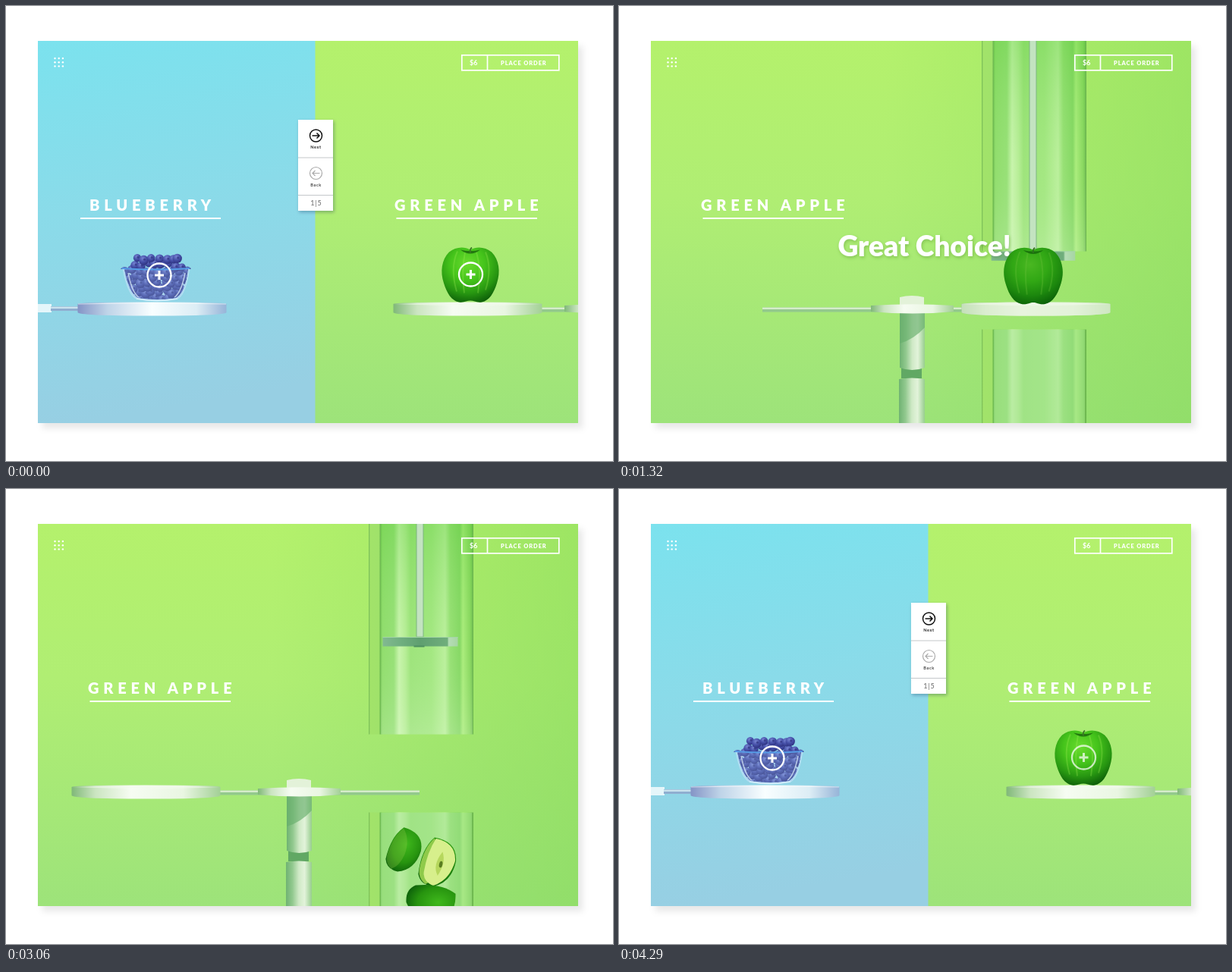
Recreate the animation shown at these times as an HTML page. Size 800x600 px, loop 4320 ms.

```html
<!DOCTYPE html>
<html lang="en">
<head>
<meta charset="utf-8">
<title>Fruit order</title>
<style>
html, body { margin: 0; width: 100%; height: 100%; overflow: hidden; background: #fff; }
svg { display: block; width: 800px; height: 600px; font-family: Lato, "Open Sans", sans-serif; }
.title { font-weight: 900; font-size: 20px; letter-spacing: 5.8px; fill: #fff; }
.small { font-size: 5.6px; font-weight: 700; letter-spacing: .6px; text-anchor: middle; }
</style>
</head>
<body>
<svg viewBox="0 0 800 600">
  <defs>
    <filter id="cardShadow" x="-5%" y="-5%" width="112%" height="112%"><feDropShadow dx="6" dy="7" stdDeviation="4" flood-color="#000" flood-opacity=".09"/></filter>
    <filter id="panelShadow" x="-30%" y="-20%" width="160%" height="140%"><feDropShadow dx="1.5" dy="2" stdDeviation="2" flood-color="#124" flood-opacity=".3"/></filter>
    <filter id="textShadow" x="-10%" y="-30%" width="120%" height="160%"><feDropShadow dx="1" dy="2" stdDeviation="2" flood-color="#3a7a20" flood-opacity=".35"/></filter>
    <linearGradient id="blue" x2=".12" y2="1"><stop stop-color="#7be2ee"/><stop offset=".45" stop-color="#8adbe9"/><stop offset="1" stop-color="#97cfe3"/></linearGradient>
    <linearGradient id="green" x2="0" y2="1"><stop stop-color="#b4f16c"/><stop offset=".4" stop-color="#b0ee73"/><stop offset="1" stop-color="#9de37a"/></linearGradient>
    <linearGradient id="sideShade"><stop offset=".5" stop-color="#86d95a" stop-opacity="0"/><stop offset="1" stop-color="#86d95a" stop-opacity=".5"/></linearGradient>
    <linearGradient id="greenPlate"><stop stop-color="#80b878"/><stop offset=".16" stop-color="#cbe5c1"/><stop offset=".4" stop-color="#f6fcf2"/><stop offset=".75" stop-color="#e9f6e2"/><stop offset="1" stop-color="#a3d096"/></linearGradient>
    <linearGradient id="bluePlate"><stop stop-color="#8494c6"/><stop offset=".2" stop-color="#bfd4e8"/><stop offset=".5" stop-color="#f8feff"/><stop offset=".8" stop-color="#dcedf5"/><stop offset="1" stop-color="#96b4d8"/></linearGradient>
    <linearGradient id="pole"><stop stop-color="#6fb272"/><stop offset=".25" stop-color="#92c98f"/><stop offset=".5" stop-color="#cfe9c6"/><stop offset=".72" stop-color="#e2f3da"/><stop offset="1" stop-color="#97cd8e"/></linearGradient>
    <linearGradient id="glass">
      <stop stop-color="#74b856"/><stop offset=".015" stop-color="#a2e36a"/><stop offset=".1" stop-color="#a0e26a"/>
      <stop offset=".11" stop-color="#6cb850"/><stop offset=".13" stop-color="#92dd6e"/><stop offset=".24" stop-color="#98e078"/>
      <stop offset=".29" stop-color="#cff6b4"/><stop offset=".35" stop-color="#bcef9c"/><stop offset=".4" stop-color="#a0e47e"/>
      <stop offset=".6" stop-color="#a6e884"/><stop offset=".73" stop-color="#c0f1a2"/><stop offset=".78" stop-color="#98e076"/>
      <stop offset=".87" stop-color="#86d765"/><stop offset=".9" stop-color="#aeee7e"/><stop offset=".97" stop-color="#88d65e"/><stop offset="1" stop-color="#67b04d"/>
    </linearGradient>
    <linearGradient id="glassDepth" x2="0" y2="1"><stop stop-color="#58cc35" stop-opacity=".35"/><stop offset=".6" stop-color="#8fe26c" stop-opacity=".1"/><stop offset="1" stop-color="#d4f5c6" stop-opacity=".25"/></linearGradient>
    <linearGradient id="press"><stop stop-color="#82b991"/><stop offset=".25" stop-color="#6fae7f"/><stop offset=".5" stop-color="#5f9f70"/><stop offset=".86" stop-color="#70ae7c"/><stop offset=".88" stop-color="#b6ddb6"/><stop offset="1" stop-color="#a6d5a3"/></linearGradient>
    <radialGradient id="appleFill" cx=".45" cy=".3" r=".75"><stop stop-color="#69dc2e"/><stop offset=".4" stop-color="#45c41b"/><stop offset=".72" stop-color="#279611"/><stop offset="1" stop-color="#0b5a08"/></radialGradient>
    <radialGradient id="skin" cx=".5" cy=".35" r=".7"><stop stop-color="#3fb81c"/><stop offset=".6" stop-color="#27940f"/><stop offset="1" stop-color="#0c5f0a"/></radialGradient>
    <radialGradient id="berry" cx=".4" cy=".3" r=".75"><stop stop-color="#7684d2"/><stop offset=".5" stop-color="#4650a8"/><stop offset="1" stop-color="#2b2f7c"/></radialGradient>
    <clipPath id="card"><rect x="42" y="46" width="712" height="504"/></clipPath>
    <clipPath id="half"><rect id="halfRect" y="45" width="800" height="506"/></clipPath>
    <clipPath id="bowlClip"><path d="M150 315H246V347H240Q236 378 224 385Q199 389 174 385Q162 378 156 347H150Z"/></clipPath>
    <path id="bowl" d="M154 347Q160 380 171 386Q199 392 227 386Q237 380 242 347Z"/>
    <path id="appleShape" d="M0-69C8-74 20-73 28-66C38-56 40-40 35-25C31-12 25-2 15 0C8 1 5-2 0-2C-5-2-8 1-15 0C-25-2-31-12-35-25C-40-40-38-56-28-66C-20-73-8-74 0-69Z"/>
    <path id="plate" d="M0 393Q0 390.500 98 390.500T196 393V404Q196 408.500 98 408.500T0 404Z"/>
    <g id="plus" fill="none" stroke="#fff"><circle r="15.500" stroke-width="2.300"/><path d="M-6 0H6M0-6V6" stroke-width="3"/></g>
  </defs>

  <rect x="42" y="46" width="712" height="504" fill="#fff" filter="url(#cardShadow)"/>
  <g clip-path="url(#card)">
    <rect x="42" y="45" width="366" height="506" fill="url(#blue)"/>
    <text class="title" x="110" y="270">BLUEBERRY</text>
    <path d="M98 280H283" stroke="#fff" stroke-width="2"/>
    <rect x="42" y="393" width="18" height="11" fill="#e5f6fa"/>
    <rect x="59" y="396" width="40" height="6" fill="#8faed0"/>
    <rect x="59" y="396.500" width="36" height="2.500" fill="#c9e3ee"/>
    <use href="#plate" x="94.500" fill="url(#bluePlate)"/>
    <path d="M95 393Q192 390 290 393" stroke="#fff" fill="none" opacity=".6"/>
    <use href="#bowl" fill="#b7dcf4" opacity=".75"/>
    <g id="berries" clip-path="url(#bowlClip)"></g>
    <use href="#bowl" fill="#a9cff0" opacity=".22" stroke="#e9f8ff"/>
    <path d="M161 352Q166 378 175 384M236 352Q231 378 222 384M172 386Q199 391 226 386" stroke="#e4f5ff" stroke-width="1.500" fill="none" opacity=".7"/>
    <path d="M153 346Q198 349 242 346" fill="none" stroke="#559be6" stroke-width="2"/>
    <use href="#plus" x="202" y="355"/>

    <g clip-path="url(#half)">
      <g id="scene">
        <rect x="-60" y="45" width="820" height="506" fill="url(#green)"/>
        <rect x="-60" y="45" width="820" height="506" fill="url(#sideShade)"/>
        <rect x="478" y="45" width="138" height="278.500" fill="url(#glass)"/>
        <rect x="494" y="45" width="121" height="278.500" fill="url(#glassDepth)"/>
        <rect x="478" y="426.500" width="138" height="124" fill="url(#glass)"/>
        <rect x="494" y="427" width="120" height="124" fill="#9fe18e" opacity=".45"/>
        <rect id="rod" x="541" y="45" width="9" fill="#c3e3c1" stroke="#7db580"/>
        <g id="presser"><rect width="99" height="12.500" fill="url(#press)"/><path d="M0 .5H99" stroke="#a3d6a4"/><path d="M41 12.500h14" stroke="#4e9060" stroke-width="2"/></g>
        <g fill="url(#pole)">
          <path d="M372 476H399V491H372Z" fill="#61a864"/>
          <path d="M369 492Q386 489 403 492V551H369Z"/>
          <path d="M370 403H403V477Q386 483 370 477Z"/>
          <path d="M370 445Q388 440 403 424V403H370Z" fill="#68b06c" opacity=".65"/>
          <path d="M370 384Q386 380 402 384V396H370Z" fill="#e3f2d9"/>
        </g>
        <rect id="arm" y="397.500" height="6" fill="#93c98d"/>
        <rect id="armLight" y="397.500" height="2.500" fill="#d5ecca"/>
        <path d="M332 395Q387 391.500 441 395V403Q387 408 332 403Z" fill="url(#greenPlate)"/>
        <g id="platform">
          <use href="#plate" fill="url(#greenPlate)"/>
          <use id="plateLight" href="#plate" fill="#e2f1d6"/>
          <path d="M1 393Q98 389.500 195 393Q98 397 1 393Z" fill="#f4fbef" opacity=".55"/>
        </g>
        <g id="fruit">
          <use href="#appleShape" fill="url(#appleFill)"/>
          <path d="M-17-67Q-27-45-18-14M-7-66Q-12-40-8-12M8-66Q15-42 10-12M20-66Q29-44 20-16" fill="none" stroke="#a2ee56" stroke-width="2" opacity=".28"/>
          <path d="M-13-69Q0-59 13-69Q0-66-13-69Z" fill="#23780f"/>
          <path d="M0-65Q-1-70 2-72" fill="none" stroke="#3c7826" stroke-width="2"/>
          <use id="fruitShade" href="#appleShape" fill="#086a08"/>
        </g>
        <g id="slices"></g>
        <text class="title" x="108" y="270">GREEN APPLE</text>
        <path d="M110.500 280H296" stroke="#fff" stroke-width="2"/>
        <use id="fruitPlus" href="#plus" x="208.500" y="354"/>
      </g>
    </g>
    <text id="praise" x="402.500" y="330" text-anchor="middle" font-size="37.200" font-weight="900" fill="#fff" filter="url(#textShadow)">Great Choice!</text>

    <g id="panel">
      <rect x="385" y="150" width="46" height="120" fill="#fff" filter="url(#panelShadow)"/>
      <path d="M385 200H431M385 249.500H431" stroke="#c4c8ca" stroke-width="1.200"/>
      <g fill="none" stroke="#111" stroke-width="1.500"><circle cx="408.500" cy="171" r="8"/><path d="M403.500 171H413M409.500 167.500L413 171L409.500 174.500"/></g>
      <g fill="none" stroke="#aaa" stroke-width="1.200"><circle cx="408.500" cy="220.500" r="8"/><path d="M413.500 220.500H404M407.500 217L404 220.500L407.500 224"/></g>
      <text class="small" x="408.500" y="187.500" fill="#222">Next</text>
      <text class="small" x="408.500" y="237.500" fill="#444">Back</text>
      <text x="409" y="263" font-size="9" letter-spacing="1" text-anchor="middle" fill="#666">1|5</text>
    </g>
  </g>
  <g id="menu" fill="#fff"></g>
  <g fill="none" stroke="#fff" stroke-width="1.700"><rect x="600.800" y="64.800" width="128" height="20"/><path d="M634.500 65V85"/></g>
  <g fill="#fff"><text x="611" y="78" font-size="9" font-weight="700">$6</text><text x="652" y="77.500" font-size="7.500" font-weight="900" letter-spacing=".9">PLACE ORDER</text></g>
</svg>
<script>
const LOOP = 4320, SLIDE = 404, POLE = 387;
const el = id => document.getElementById(id);
const set = (id, attrs) => { for (const k in attrs) el(id).setAttribute(k, attrs[k]); };
const ramp = (t, a, b) => Math.min(1, Math.max(0, (t - a) / (b - a)));
const smooth = u => u * u * (3 - 2 * u);
const cubic = u => u < .5 ? 4 * u ** 3 : 1 - 4 * (1 - u) ** 3;
const ease = (t, a, b) => cubic(ramp(t, a, b));
const mix = (a, b, u) => a + (b - a) * u;

let seed = 7;
const random = () => (seed = seed * 16807 % 2147483647) / 2147483647;

let berries = '';
for (let row = 0; row < 8; row++) {
  for (let i = 0; i < 10; i++) {
    const x = 158 + i * 8.8 + random() * 5 - (row % 2) * 3;
    const y = 382 - row * 7.2 + random() * 6;
    if (y < 347 && Math.abs(x - 198) > 38 - (347 - y) * .45) continue;
    const r = 5 + random() * 1.5;
    berries += `<circle cx="${x}" cy="${y}" r="${r}" fill="url(#berry)"/><circle cx="${x + 1}" cy="${y - 1}" r="1.500" fill="#272b73" opacity=".6"/>`;
  }
}
el('berries').innerHTML = berries;

for (let i = 0; i < 9; i++)
  el('menu').innerHTML += `<circle cx="${64.5 + i % 3 * 5.2}" cy="${69 + (i / 3 | 0) * 5.2}" r="1.200"/>`;

// Each slice: burst position and tilt, landing position and tilt, scale, flesh side shown
const slices = [
  { burst: [536, 343, -50], fall: [535, 610, 10], size: .95, flesh: .25 },
  { burst: [579, 352, 15], fall: [569, 493, 12], size: 1.1, flesh: 1 },
  { burst: [514, 352, -15], fall: [525, 477, 18], size: 1, flesh: .3 },
  { burst: [558, 345, 35], fall: [560, 622, -40], size: .8, flesh: .4 },
  { burst: [514, 380, -12], fall: [515, 630, 60], size: .95, flesh: .1 },
  { burst: [548, 389, 78], fall: [560, 545, 90], size: 1.12, flesh: 0 }
];
slices.forEach(s => {
  s.node = document.createElementNS('http://www.w3.org/2000/svg', 'g');
  s.node.innerHTML = `<path d="M-10-29Q18-30 21-6Q21 20 0 29Q-15 30-20 18Q-23-12-10-29Z" fill="url(#skin)"/>
    <g class="flesh"><path d="M-10-28Q3-16 2 5Q0 22-9 28Q-20 23-20 10Q-20-14-10-28Z" fill="#8fca4a"/></g>
    <g class="core"><path d="M-8-28Q17-28 20-6Q18 18 0 28Q-13 25-14 14Q-15-10-8-28Z" fill="#d7ef8c"/>
    <path d="M3-14Q10-2 3 15Q-6 4 3-14Z" fill="#b6d75d"/><ellipse cx="4" cy="1" rx="2" ry="4" fill="#5a7d20"/></g>`;
  el('slices').append(s.node);
});

function drawSlices(t) {
  const spread = 1 - (1 - ramp(t, 1430, 2040)) ** 3;
  const drop = (Math.max(0, t - 2040) / 1020) ** 2;
  const visible = t > 1430 && t < 3700;
  el('slices').style.display = visible ? '' : 'none';
  if (!visible) return;
  for (const { burst, fall, size, flesh, node } of slices) {
    const settle = Math.min(1, drop);
    const x = mix(mix(545, burst[0], spread), fall[0], settle);
    const y = mix(mix(360, burst[1], spread), fall[1], drop);
    const tilt = mix(burst[2] * (.4 + .6 * spread), fall[2], settle);
    node.setAttribute('transform', `translate(${x} ${y}) rotate(${tilt}) scale(${size})`);
    node.querySelector('.flesh').setAttribute('opacity', flesh * spread);
    node.querySelector('.core').setAttribute('opacity', flesh === 1 ? settle : 0);
  }
}

function draw(t) {
  const away = ease(t, 200, 1292);
  const shift = SLIDE * (1 - away + ease(t, 3270, 4185));
  const panelShift = SLIDE * (ease(t, 3270, 4303) - ease(t, 200, 1238));
  const split = t < 2000 ? 407.5 + panelShift : 3.5 + shift;
  set('halfRect', { x: split });
  set('scene', { transform: `translate(${shift} 0)` });
  set('panel', { transform: `translate(${panelShift} 0)` });

  // Carousel: cosine is -1 with the plate on the left, +1 under the press
  const cos = -Math.cos(Math.PI * (away - ease(t, 1580, 2440)));
  const middle = POLE - 20 * Math.max(0, 1 - shift / SLIDE * 1.35);
  const plate = middle + 182.5 * cos;
  const tip = middle - 178 * cos;
  const bar = { x: Math.min(plate, tip), width: Math.abs(plate - tip) };
  const right = (cos + 1) / 2;
  set('platform', { transform: `translate(${plate - 98} 0)` });
  set('plateLight', { opacity: right * .7 });
  set('arm', bar);
  set('armLight', bar);

  set('fruit', {
    transform: `translate(${plate - 3.5 * cos} ${mix(390.5, 393, right)}) scale(${mix(1, 1.03, right)})`,
    opacity: t < 2000 ? +(t < 1430) : ramp(t, 3270, 3420)
  });
  set('fruitShade', { opacity: right * .32 });
  set('fruitPlus', { opacity: t < 2000 ? 1 - ramp(t, 100, 300) : ramp(t, 4140, 4350) });

  const press = 160 * (smooth(ramp(t, 1020, 1440)) - smooth(ramp(t, 1500, 1950)));
  const widen = 1 + press / 1100;
  set('presser', { transform: `translate(${546 - 49.5 * widen} ${195 + press}) scale(${widen} 1)` });
  set('rod', { height: 150 + press });
  drawSlices(t);

  set('praise', { opacity: ramp(t, 760, 1080) * (1 - ramp(t, 1860, 2130)) });
}

let start;
function tick(now) {
  start ??= now;
  draw((now - start) % LOOP);
  requestAnimationFrame(tick);
}
draw(0);
requestAnimationFrame(tick);
</script>
</body>
</html>
```
